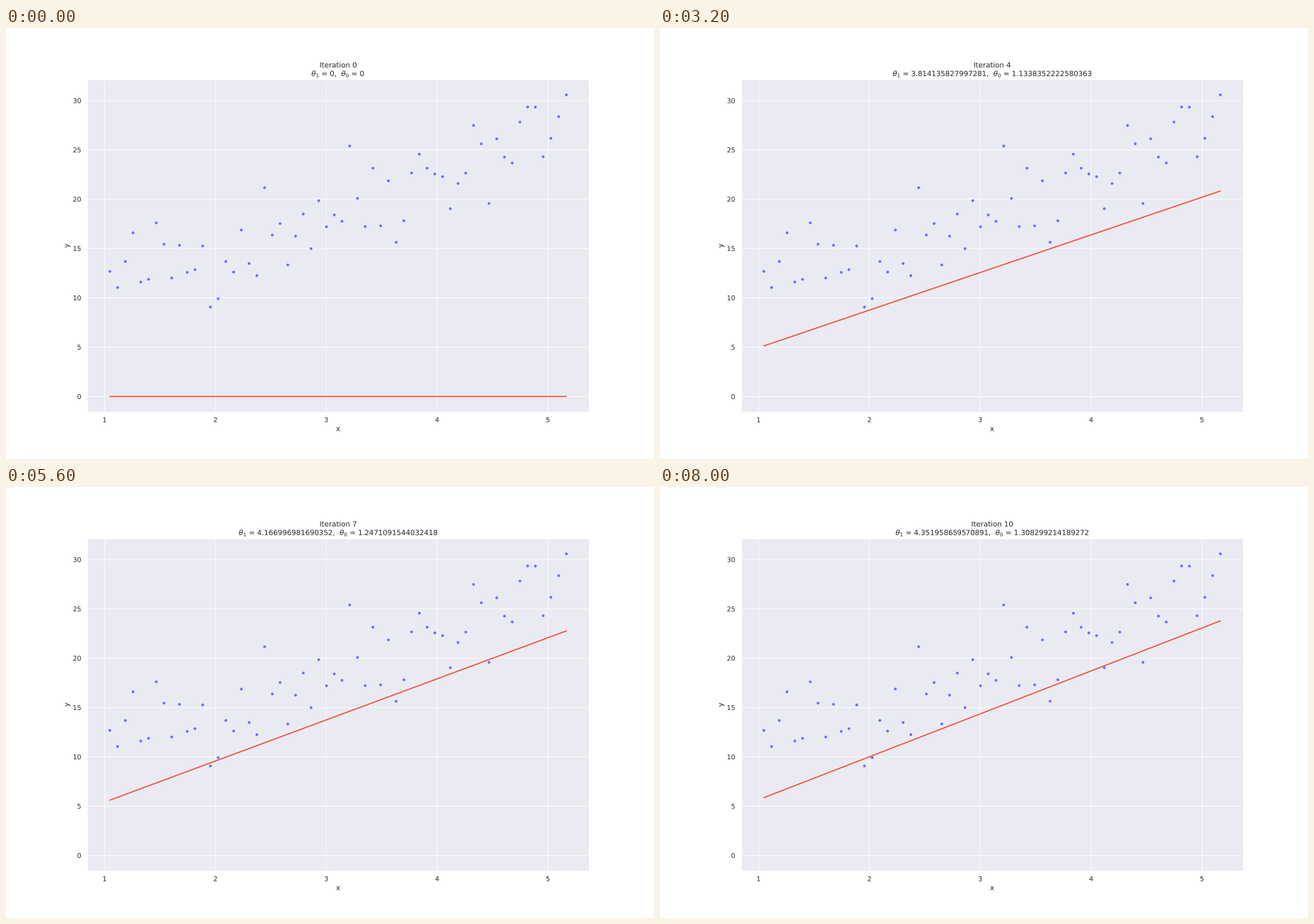
Recreate the animation shown at these times as a matplotlib script. Size 917 by 611 pixels, loop 8800 ms.

```python
import matplotlib.pyplot as plt
import numpy as np
from matplotlib import patheffects
from matplotlib.animation import FuncAnimation

WIDTH, HEIGHT, DPI = 917, 611, 64
K = WIDTH / 15 / DPI  # sizes below are points on a 15 inch wide figure
INK = "#262626"
STEPS = 11
RATE = 0.04

plt.rcParams.update({
    "font.family": "DejaVu Sans",
    "mathtext.fontset": "dejavusans",
    "text.hinting": "none",
    "text.color": INK,
    "axes.labelcolor": INK,
    "axes.facecolor": "#EAEAF2",
    "axes.edgecolor": "white",
    "axes.linewidth": 1.25 * K,
    "axes.axisbelow": True,
    "axes.labelsize": 12 * K,
    "axes.labelpad": 4 * K,
    "axes.grid": True,
    "grid.color": "white",
    "grid.linewidth": 1 * K,
    "lines.solid_capstyle": "round",
    # Outlined text and markers keep their sub-pixel positions
    "path.effects": [patheffects.Normal()],
})
for axis in ("xtick", "ytick"):
    plt.rcParams.update({
        f"{axis}.color": INK,
        f"{axis}.labelsize": 11 * K,
        f"{axis}.major.size": 6 * K,
        f"{axis}.major.pad": 3.5 * K,
    })

# Noisy samples around y = 4x + 7
rng = np.random.RandomState(42)
x = np.radians(np.arange(60, 300, 4))
y = 4 * x + 7 + rng.normal(0, 3, len(x))


def descend(slope, intercept, k):
    """One gradient step with the learning rate decaying as 1/k."""
    error = slope * x + intercept - y
    rate = RATE / k
    return (slope - rate * np.mean(error * x),
            intercept - rate * np.mean(error))


fits = [(0, 0)]
for k in range(1, STEPS):
    fits.append(descend(*fits[-1], k))

fig, ax = plt.subplots(figsize=(WIDTH / DPI, HEIGHT / DPI), dpi=DPI,
                       facecolor="white")
fig.subplots_adjust(left=0.125, right=0.9, bottom=0.11, top=0.88)
ax.plot(x, y, ".", color="#636EFA", markersize=7 * K, markeredgewidth=1 * K)
line, = ax.plot(x, 0 * x, color="#EF553B", linewidth=2 * K, snap=False)
ax.set(xlabel="x", ylabel="y", xticks=range(1, 6), yticks=range(0, 31, 5))
ax.tick_params(bottom=False, left=False)
ax.set_xlim(ax.get_xlim())
ax.set_ylim(ax.get_ylim())
for grid_line in ax.get_xgridlines() + ax.get_ygridlines():
    grid_line.set_snap(False)


def caption(rise):
    """Centred text whose baseline is `rise` points above the axes."""
    return ax.annotate("", (0.5, 1), xycoords="axes fraction",
                       xytext=(0, rise * K), textcoords="offset points",
                       ha="center", va="baseline", fontsize=12 * K)


heading, formula = caption(20.4), caption(6)


def update(k):
    slope, intercept = fits[k]
    line.set_ydata(slope * x + intercept)
    heading.set_text(f"Iteration {k}")
    formula.set_text(rf"$\theta_1$ = {slope},  $\theta_0$ = {intercept}")
    return line, heading, formula


anim = FuncAnimation(fig, update, frames=STEPS, interval=800,
                     init_func=lambda: update(0), repeat=True, repeat_delay=0)
plt.show()
```
